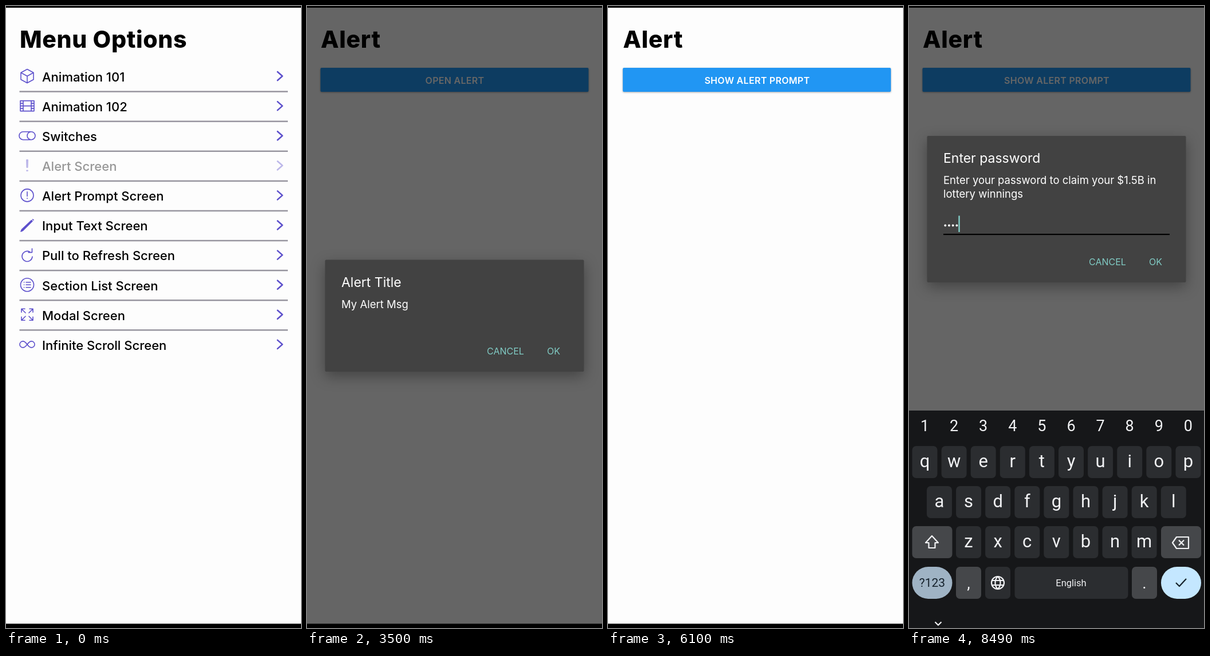
Recreate the animation shown at these times as an HTML page. Size 515 by 1087 pixels, loop 8550 ms.

```html
<!DOCTYPE html>
<html lang="en">
<head>
<meta charset="utf-8">
<title>Menu and alerts</title>
<style>
  html, body { margin: 0; width: 100%; height: 100%; overflow: hidden; background: #fdfdfd; }
  svg { display: block; font-family: Inter, "Open Sans", sans-serif; }
  .h1 { font-size: 41px; font-weight: 800; letter-spacing: .65px; }
  .label { font-size: 16px; font-weight: 600; letter-spacing: .3px; fill: #fff; text-anchor: middle; }
  .icon { fill: none; stroke: #5d50cc; stroke-width: 1.6; stroke-linejoin: round; stroke-linecap: round; }
  .bold { stroke-width: 2.6; }
  .dialog { fill: #fff; filter: drop-shadow(0 8px 12px #0005); }
  .action { font-size: 16px; fill: #80cbc4; }
  #menu { font-weight: 500; }
  #button { filter: drop-shadow(0 1px 1.5px #0005); }
  #keyboard { font-family: Roboto, sans-serif; fill: #f1f2f4; text-anchor: middle; }
  .glyph { fill: none; stroke: #f1f2f4; stroke-width: 2.2; stroke-linejoin: round; }
</style>
</head>
<body>
<svg width="515" height="1087" viewBox="0 0 515 1087">
  <defs>
    <radialGradient id="glow">
      <stop offset="0" stop-color="#fff"/>
      <stop offset=".55" stop-color="#fff" stop-opacity=".85"/>
      <stop offset="1" stop-color="#fff" stop-opacity="0"/>
    </radialGradient>
    <clipPath id="buttonClip"><rect x="23.5" y="108" width="468" height="42" rx="2"/></clipPath>
  </defs>
  <rect width="515" height="1087" fill="#fdfdfd"/>
  <g id="menu"></g>
  <g id="screen">
    <rect x="-60" width="575" height="1087" fill="#fdfdfd"/>
    <text class="h1" x="24" y="72.5">Alert</text>
    <rect id="button" x="23.5" y="108" width="468" height="42" rx="2" fill="#2196f3"/>
    <g clip-path="url(#buttonClip)"><circle id="ripple" cx="258" cy="129" fill="url(#glow)"/></g>
    <text class="label" id="caption" x="258" y="135.7"></text>
  </g>
  <path d="M0 0H515V3H0ZM0 1079.5H515V1087H0Z"/>
  <rect id="dim" width="515" height="1087"/>
  <g id="alert" class="dialog"></g>
  <g id="prompt" class="dialog"></g>
  <g id="keyboard"></g>
</svg>
<script>
const LOOP = 8550;
const $ = id => document.getElementById(id);
const text = (x, y, size, str, attrs = '') =>
  `<text x="${x}" y="${y}" font-size="${size}" ${attrs}>${str}</text>`;
const rect = (x, y, w, h, r, fill) =>
  `<rect x="${x}" y="${y}" width="${w}" height="${h}" rx="${r}" fill="${fill}"/>`;

// Menu: label and icon path, drawn around the icon centre
const ring = r => `M${-r} 0a${r} ${r} 0 1 0 ${2 * r} 0a${r} ${r} 0 1 0 ${-2 * r} 0`;
const items = [
  ['Animation 101', 'M0-12L11-6V6L0 12L-11 6V-6ZM-11-6L0 0L11-6M0 0V12'],
  ['Animation 102', 'M-12-9H12V9H-12ZM-7-9V9M7-9V9M-7 0H7M-12-4.5H-7M-12 0H-7M-12 4.5H-7M7-4.5H12M7 0H12M7 4.5H12'],
  ['Switches', 'M-7-7H7A7 7 0 0 1 7 7H-7A7 7 0 0 1-7-7M7-7A7 7 0 0 0 7 7'],
  ['Alert Screen', 'M-.7-9.5H.7L.3 3H-.3ZM-.6 9H.6', 'bold'],
  ['Alert Prompt Screen', ring(11) + 'M0-6V1.5M0 5V5.5'],
  ['Input Text Screen', 'M-11 11L-9.5 7.5L7.5-8.5L9-7L-7.5 9.5ZM-9 9L8-8M9.5-10L11-9'],
  ['Pull to Refresh Screen', 'M9 3A9 9 0 1 1 4.5-5.5M8.5-11V-4.5H2'],
  ['Section List Screen', ring(11.5) + 'M-2-4.5H6M-2 0H6M-2 4.5H6M-5.5-4.5H-5.2M-5.5 0H-5.2M-5.5 4.5H-5.2'],
  ['Modal Screen', 'M-4-10H-10V-4M-10-10L-3-3M4-10H10V-4M10-10L3-3M-4 10H-10V4M-10 10L-3 3M4 10H10V4M10 10L3 3'],
  ['Infinite Scroll Screen', 'M0 0C-3-4-5-5.5-7.5-5.5A5.5 5.5 0 0 0-7.5 5.5C-5 5.5-3 4 0 0C3-4 5-5.5 7.5-5.5A5.5 5.5 0 0 1 7.5 5.5C5 5.5 3 4 0 0'],
];
$('menu').innerHTML = '<text class="h1" x="24" y="72.5">Menu Options</text>' +
  items.map(([name, icon, weight = ''], i) => {
    const y = 122.5 + 52.1 * i;
    const line = i < items.length - 1 ? rect(23.5, y + 25.8, 468.5, 2.5, 0, '#97959f') : '';
    return `${line}<g id="row${i}">
      <path class="icon ${weight}" transform="translate(37 ${y})" d="${icon}"/>
      ${text(63, y + 9.3, 22, name)}
      <path class="icon bold" transform="translate(478 ${y})" d="M-4-7.5L4.5 0L-4 7.5"/></g>`;
  }).join('');

// Dialogs, with their top edge at y = 0
const dialog = (height, title, lines, extra = '') =>
  rect(31.5, 0, 452, height, 2, '#424242') + text(60, 47, 23, title) +
  lines.map((s, i) => text(60, 84 + 23.5 * i, 18.5, s)).join('') + extra +
  text(314, height - 30.5, 16, 'CANCEL', 'class="action"') +
  text(419, height - 30.5, 16, 'OK', 'class="action"');
$('alert').innerHTML = dialog(195.5, 'Alert Title', ['My Alert Msg']);
$('prompt').innerHTML = dialog(256, 'Enter password',
  ['Enter your password to claim your $1.5B in', 'lottery winnings'],
  [0, 1, 2, 3].map(i => `<circle cx="${63.3 + 6.7 * i}" cy="156.5" r="1.9"/>`).join('') +
  rect(86.3, 139.5, 2.5, 28.5, 0, '#80cbc4') + rect(60, 171, 395, 2.2, 0, '#000'));

// Keyboard
const PITCH = 51.1, DARK = '#2b2d30', MID = '#45474a';
const key = (x, y, w, fill, r = 7) => rect(x, y, w, 56, r, fill);
const keyRow = (letters, x, y) => [...letters].map((c, i) =>
  key(x + PITCH * i, y, 44, DARK) + text(x + 22 + PITCH * i, y + 36.5, 31, c)).join('');
const glyph = (x, y, d, stroke = '#f1f2f4') =>
  `<path class="glyph" style="stroke:${stroke}" transform="translate(${x} ${y})" d="${d}"/>`;
$('keyboard').innerHTML = rect(0, 707, 515, 380, 0, '#161719') +
  [...'1234567890'].map((c, i) => text(27.5 + PITCH * i, 743, 27, c)).join('') +
  keyRow('qwertyuiop', 5.5, 769) + keyRow('asdfghjkl', 31, 839) + keyRow('zxcvbnm', 82, 909) +
  key(5.5, 909, 70, MID) + glyph(40, 937, 'M0-11L11 1H5.5V10H-5.5V1H-11Z') +
  key(440, 909, 70, MID) + glyph(474, 938, 'M-14 0L-7-10H14V10H-7ZM-3-4.5L6 4.5M6-4.5L-3 4.5') +
  key(5.5, 980, 70, '#9fb3c4', 28) + text(40.5, 1015, 21, '?123', 'fill="#15212b"') +
  key(82, 980, 44, MID) + text(104, 1018, 28, ',') +
  key(133, 980, 44, DARK) + glyph(155, 1008, ring(11) + 'M0-11C-6-5-6 5 0 11C6 5 6-5 0-11M-10-4H10M-10 4H10') +
  key(184.5, 980, 198, DARK) + text(283, 1014, 16.5, 'English') +
  key(389, 980, 44, MID) + text(411, 1018, 28, '.') +
  key(440, 980, 70, '#c4e7ff', 28) + glyph(475, 1008, 'M-9 0L-3 6L9-7', '#15212b') +
  glyph(51, 1079, 'M-5.5-2.5L0 3L5.5-2.5');

// Motion
const clamp = x => Math.min(1, Math.max(0, x));
const ramp = (t, start, length) => clamp((t - start) / length);
const easeOut = x => 1 - (1 - x) ** 2;
const bezier = (a, b, u) => 3 * a * u * (1 - u) ** 2 + 3 * b * u * u * (1 - u) + u ** 3;
function glide(x) {
  let lo = 0, hi = 1;
  for (let i = 0; i < 20; i++) {
    const mid = (lo + hi) / 2;
    if (bezier(.2, 0, mid) < x) lo = mid; else hi = mid;
  }
  return bezier(0, 1, (lo + hi) / 2);
}
const SLIDE = 51.5;
const fade = (id, value) => $(id).setAttribute('opacity', value);
const move = (id, x, y) => $(id).setAttribute('transform', `translate(${x} ${y})`);

function draw(t) {
  // Page transitions: in, back, in again
  const leaving = t >= 4330 && t < 5500;
  const start = t < 4330 ? 220 : leaving ? 4330 : 5800;
  const p = glide(ramp(t, start, 450));
  const shown = leaving ? 1 - p : p;
  const veil = ramp(t, start + (leaving ? 35 : 50), 83);
  move('menu', -SLIDE * shown, 0);
  move('screen', SLIDE * (1 - shown), 0);
  fade('screen', leaving ? 1 - veil : veil);
  fade('row3', t < 4000 ? .4 : 1);
  fade('row4', t < 4880 ? 1 : t < 5050 ? .7 : .45);

  // Button press
  const second = t > 5500;
  const since = t - (second ? 6990 : 1500);
  $('caption').textContent = second ? 'SHOW ALERT PROMPT' : 'OPEN ALERT';
  $('ripple').setAttribute('r', 40 + 260 * easeOut(clamp(since / 450)));
  fade('ripple', .23 * clamp(since / 150) * (1 - ramp(since, 400, 400)));

  // Dialogs
  const open = second ? 7353 : 1790;
  const close = second ? Infinity : 3520;
  const alpha = easeOut(ramp(t, open, 150)) * (1 - ramp(t, close, 150));
  const dim = ramp(t, open + 8, 200) * (1 - ramp(t, close, 200));
  fade('dim', .6 * dim);
  fade('alert', second ? 0 : alpha);
  fade('prompt', second ? alpha : 0);
  move('alert', 0, t < 3050 ? 444.5 : 443.5);

  const raised = easeOut(ramp(t, 7880, 330));
  move('prompt', 0, 414 - 187 * raised);
  move('keyboard', 0, 380 * (1 - raised));
}

function tick() {
  draw(performance.now() % LOOP);
  requestAnimationFrame(tick);
}
tick();
</script>
</body>
</html>
```
